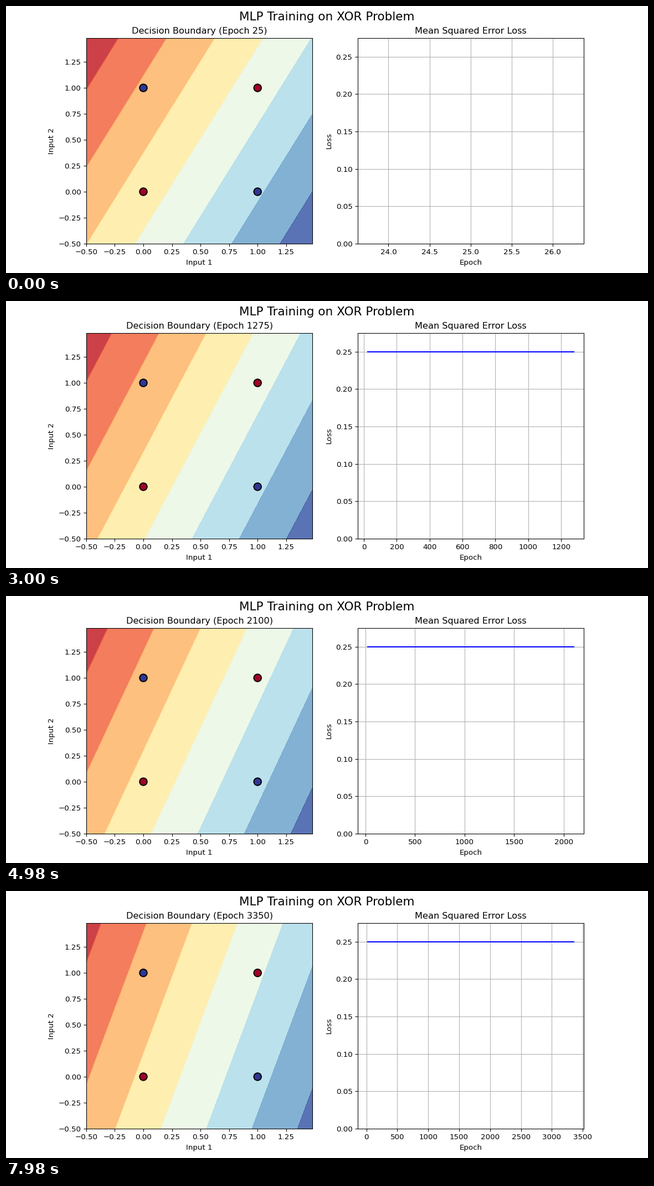
Write a matplotlib script that moves like this. It is 1159 by 483 pixels and loops after 8000 ms.

```python
import numpy as np
import matplotlib.pyplot as plt
from matplotlib.animation import FuncAnimation

W, H, DPI = 1159, 483, 96.6
TICK_MS, LOOP_MS = 40, 8000
STEP_MS = 60
EPOCHS_PER_STEP = 25
LO, HI = -0.5, 1.48
MID = (LO + HI) / 2
LEVELS = np.arange(-4, 5)

# the extra 1e-6 keeps the pixel size from being rounded down
fig, (ax, ax_loss) = plt.subplots(
    1, 2, figsize=((W + 1e-6) / DPI, (H + 1e-6) / DPI), dpi=DPI)
fig.suptitle("MLP Training on XOR Problem", fontsize=16)

# fixed ticks and title heights spare layout work on every draw
ticks = np.arange(-0.5, 1.3, 0.25)
labels = [f"{t:.2f}".replace("-", "\u2212") for t in ticks]
ax.set_xticks(ticks, labels)
ax.set_yticks(ticks, labels)
ax.set(xlim=(LO, HI), ylim=(LO, HI), xlabel="Input 1", ylabel="Input 2")
title = ax.set_title("", y=1.0)
ax.scatter([0, 0, 1, 1], [0, 1, 0, 1], c=[0, 1, 1, 0], cmap="RdYlBu",
           s=100, edgecolors="k", linewidths=1.5, zorder=2)

loss_ticks = np.arange(0, 0.26, 0.05)
ax_loss.set_yticks(loss_ticks, [f"{t:.2f}" for t in loss_ticks])
ax_loss.set(ylim=(0, 0.275), xlabel="Epoch", ylabel="Loss")
ax_loss.set_title("Mean Squared Error Loss", y=1.0)
ax_loss.grid(True)
loss_line, = ax_loss.plot([], [], "b-")

# the output is almost linear, so the corners are enough
gx, gy = np.meshgrid([LO, HI], [LO, HI])
bands = None


def output(epoch):
    """Network output over the plane, in units of one contour level."""
    tilt = 0.5672 - 6.81e-5 * epoch
    spacing = 0.4225 - 7.15e-6 * epoch
    return ((gx - MID) - tilt * (gy - MID)) / spacing


def loss_range(epoch):
    """Range from the first epoch to this one with a 5 % margin."""
    first, last = EPOCHS_PER_STEP, epoch
    if first == last:
        first, last = 0.95 * first, 1.05 * last
    pad = 0.05 * (last - first)
    return first - pad, last + pad


def update(i):
    global bands
    step = (i * TICK_MS + TICK_MS // 2) // STEP_MS
    epoch = EPOCHS_PER_STEP * (step + 1)
    if bands is not None:
        bands.remove()
    bands = ax.contourf(gx, gy, output(epoch), levels=LEVELS,
                        cmap="RdYlBu", alpha=0.85)
    title.set_text(f"Decision Boundary (Epoch {epoch})")

    loss_line.set_data([EPOCHS_PER_STEP, epoch], [0.25, 0.25])
    loss_line.set_visible(step > 0)
    ax_loss.set_xlim(loss_range(epoch))
    return bands, title, loss_line


anim = FuncAnimation(fig, update, frames=LOOP_MS // TICK_MS, interval=TICK_MS,
                     init_func=lambda: (), repeat=True, repeat_delay=0)
plt.show()
```
